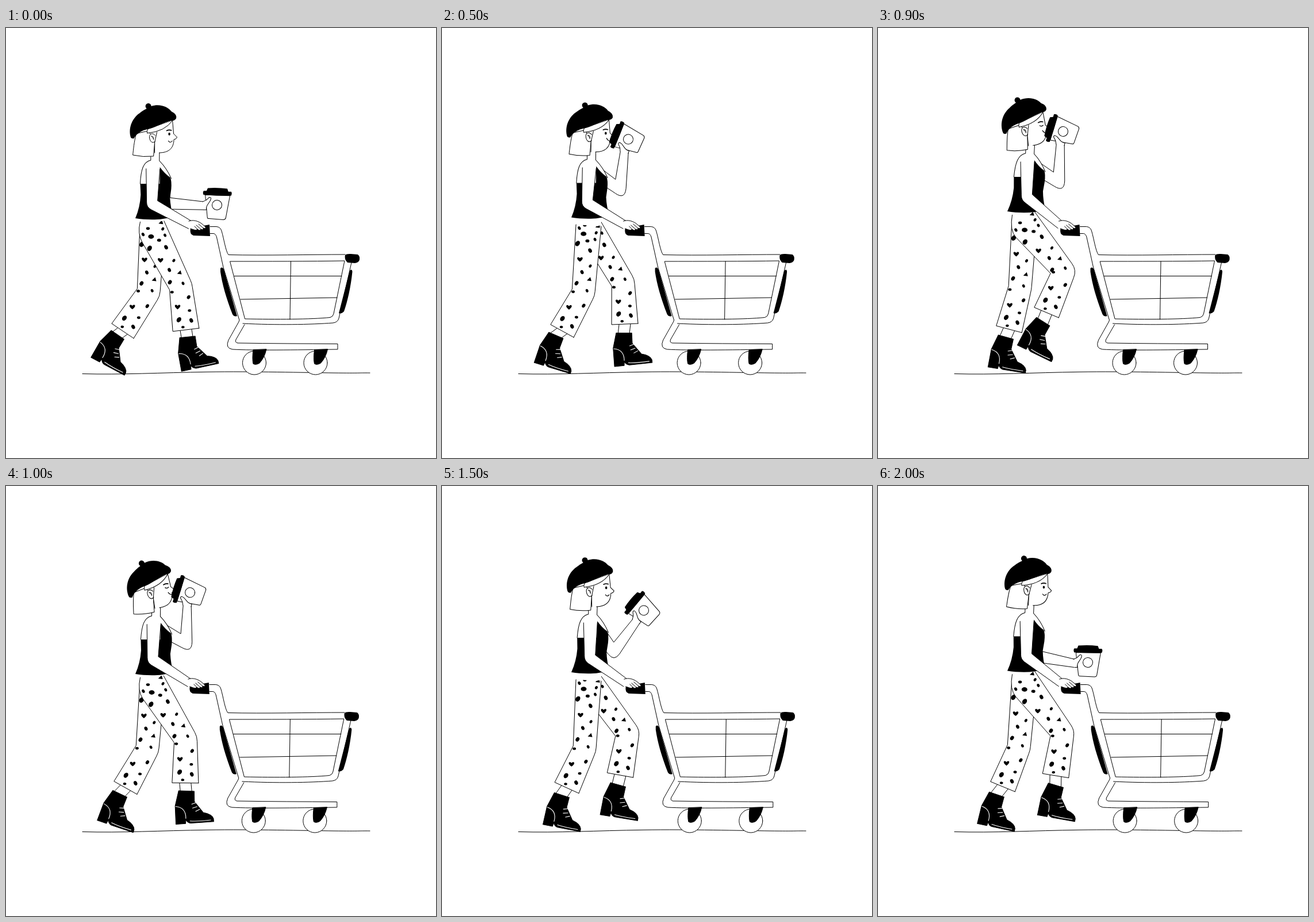
Recreate the animation shown at these times as an HTML page with a canvas. Size 748 by 748 pixels, loop 2.1 s.

```html
<!DOCTYPE html>
<html lang="en">
<head>
<meta charset="utf-8">
<title>Shopping walk</title>
<style>
html, body { margin: 0; width: 100%; height: 100%; overflow: hidden; background: #fff; }
canvas { display: block; width: 748px; height: 748px; }
</style>
</head>
<body>
<canvas id="stage"></canvas>
<script>
const SIZE = 748, LOOP = 2100, STRIDE = 1050, TICK = 100;
const canvas = document.getElementById('stage');
const ctx = canvas.getContext('2d');
const dpr = window.devicePixelRatio || 1;
canvas.width = canvas.height = SIZE * dpr;

const rad = d => d * Math.PI / 180;
const mix = (a, b, u) => a + (b - a) * u;
const mod = (a, n) => ((a % n) + n) % n;

// Cyclic keys [time, ...values], joined by a smooth curve without overshoot.
function track(keys, period) {
  const n = keys.length;
  const at = i => {
    const w = Math.floor(i / n);
    return keys[i - w * n].map((v, j) => j ? v : v + w * period);
  };
  const slope = (a, b, j) => (b[j] - a[j]) / (b[0] - a[0]);
  const blend = (s, r) => s * r <= 0 ? 0 : 2 * s * r / (s + r);
  return time => {
    const t = mod(time, period);
    let i = -1;
    while (i < n - 1 && keys[i + 1][0] <= t) i++;
    const [a, b, c, d] = [i - 1, i, i + 1, i + 2].map(at);
    const h = c[0] - b[0], u = (t - b[0]) / h;
    return b.slice(1).map((v, k) => {
      const j = k + 1, s = slope(b, c, j);
      const m0 = blend(slope(a, b, j), s) * h, m1 = blend(s, slope(c, d, j)) * h;
      const dv = c[j] - v;
      return v + u * (m0 + u * (3 * dv - 2 * m0 - m1 + u * (m0 + m1 - 2 * dv)));
    });
  };
}

// phase, knee x y, cuff x y, boot x y, boot angle
const nearLeg = track([
  [0, 304, 450, 313, 525, 315, 537, -12],
  [.143, 298, 455, 286, 527, 282, 542, 0],
  [.4286, 248, 457, 217, 525, 208, 537, 11],
  [.476, 246, 460, 209, 527, 198, 534, 17],
  [.619, 261, 467, 214, 522, 202, 531, 45],
  [.74, 297, 438, 247, 497, 235, 507, 58],
  [.857, 323, 424, 293, 495, 287, 510, 26],
  [.905, 321, 430, 309, 504, 309, 520, 10]
], 1);
const farLeg = track([
  [.119, 305, 452, 303, 525, 302, 541, -2],
  [.357, 247, 452, 228, 524, 222, 537, 9],
  [.405, 245, 455, 217, 523, 206, 536, 12],
  [.5, 248, 460, 203, 527, 194, 533, 28],
  [.643, 271, 472, 227, 514, 216, 525, 61],
  [.78, 300, 437, 262, 497, 250, 506, 50],
  [.929, 323, 430, 310, 503, 306, 519, 9],
  [.976, 315, 443, 318, 515, 316, 530, -6]
], 1);
const bob = track([
  [0, 0], [.119, 2.5], [.143, 1], [.357, -12], [.405, -9.5], [.4286, -7], [.476, -1.5]
], .5);
const tilt = track([
  [0, 0], [500, .4], [900, -5.8], [1200, -13.7], [1500, -.8], [1700, .8], [2000, 2.3]
], LOOP);
// time, cup x y, cup angle
const cupPose = track([
  [0, 367, 308, 2], [120, 367, 296, -10], [250, 353, 228, -47], [400, 327, 198, -65],
  [500, 324, 195, -68], [900, 322, 192, -73], [1200, 316, 184, -71],
  [1500, 351, 222, -50], [1700, 368, 294, -13], [1850, 366, 306, -2], [2000, 365, 307, 1]
], LOOP);

// along the leg (0 hip, 1 knee, 2 cuff), across, size, kind
const DOT = 0, HEART = 1, TRI = 2;
const spots = [
  [0, -.3, 3.2, DOT], [0, .72, 4, TRI], [.05, -.72, 3.2, DOT], [.13, -.35, 5, DOT],
  [.1, .65, 3, DOT], [.2, .6, 3, DOT], [.23, 0, 3.5, DOT], [.28, -.78, 5, DOT],
  [.37, .28, 4, DOT], [.51, -.5, 4.5, HEART], [.6, .4, 3, DOT], [.7, -.25, 3.6, DOT],
  [.8, .4, 4, TRI], [.87, -.65, 4, DOT], [.97, .3, 3, DOT], [1.1, -.8, 3, DOT],
  [1.26, .55, 3.6, DOT], [1.45, -.45, 4.5, HEART], [1.57, .47, 3, DOT],
  [1.75, -.45, 4.8, DOT], [1.8, .5, 4, DOT], [1.93, -.2, 2.8, DOT]
];

const path = d => new Path2D(d);
const art = {
  ground: path('M133 601.5 C200 603.5 270 599.5 350 598.3 S520 599.5 570 600 S610 599.8 633 600'),
  frame: path('M355 345.5 H366 Q373 346 375 353 C379 366 382 388 387 394.5 C450 396 530 394 590 394' +
    'M355 357.5 H361 Q365 358 366.5 364 L378 416 L405 505 Q407 508 405 511 L387 543 Q381 557 394 559' +
    'C430 561 500 560 577 559 V549.5 C520 549 460 549 403 548 Q398 547 400 542 L415 516' +
    'M390 406 C450 406 530 406 589 405 L570 497 Q569 502 564 503.500 C530 507 470 507 416 506 Z' +
    'M412 514 C470 517 530 516 569 513 Q577 512 579 505 L601 408' +
    'M397 431.500 H584 M408 472 L576 469 M495.500 406 L494 507'),
  pads: path('M321 348 L354 342 L355 362 L326 361 Q319 359 321 348Z' +
    'M590 395 Q592 392.5 600 393 L612 394 Q616 397 615 403 Q614 408 607 409 L594 408 Q588 402 590 395Z' +
    'M598 422 Q602 418 602.5 424 C600 450 594 476 588 493 Q583 498 579 496Z' +
    'M373 418 Q376 414 379 420 L402 501 Q397 503 394 498 C383 470 376 445 373 424Z'),
  fork: path('M430 560 Q428 575 430 584 Q434 587 441 583 Q450 573 453 559Z'),
  boot: path('M-13 -1 L14 2 L13 20 L27 40 Q42 44 44 52 V57 H4 Q-2 56 -4 50 L-5 57 H-22 L-21 25Z'),
  seams: path('M-20 26 C-8 28 -3 36 -4 48 M3 53 Q18 55 39 54 M8 24 l7 -2 M9 31 l8 -2 M14 37 l7 -3'),
  skin: path('M251 215 L266 214 V231 Q279 244 287 262 L267 273 H233 C234 246 238 233 251 230Z'),
  chest: path('M251 220 V230 C238 233 234 246 233 271 M266 216 V231 Q279 244 287 262'),
  shirt: path('M233 271 H267 V242 Q275 253 285 260 Q288 266 287 280 L285 296 Q286 312 291 328' +
    'C270 335 245 334 225 331 Q233 312 234 290Z'),
  hair: path('M226 184 C222 198 221 212 220 221 Q238 225 256 223 L258 199 L262 176Z'),
  face: path('M258 217 L258 198 L246 176 L289 161 L291 184 L297 190 Q295 194 291.5 194 C291 209 283 217 266 217'),
  fringe: path('M246 176 Q244 180 245 183 Q276 180 289 161 M262 181 L258 199'),
  ear: path('M259 187 C255 181 248 184 249 191 C250 198 255 202 259 197 M252 188 Q257 188 256 194'),
  beret: path('M216 189 C212 172 220 156 232 148 C238 143 243 141 244 140 A5 5 0 1 1 252 136' +
    'C268 131 282 138 287 145 Q297 150 295.5 157 Q293 162 287 161 C270 166 254 175 246 176' +
    'C235 178 225 185 222 192 Q217 193 216 189Z'),
  cup: path('M-21 -17 L-16 22 Q-16 24 -13 24 L12 25 Q15 25 16 22 L22 -17Z'),
  lid: path('M-24 -24 H-19 L-17 -29 Q0 -31 17 -29 L19 -24 H24 Q26 -21 24 -17 Q0 -16 -24 -17 Q-26 -21 -24 -24Z'),
  grip: path('M-25 -5 L-19 -8 L-14 -13 Q-9 -14 -12 -7 L-17 1 Q-19 6 -18 9 L-23 9'),
  hand: path('M318 336 C326 333 334 336 340 340 L347 346 Q348 350 343 348 Q344 352 339 350' +
    'Q338 354 333 350 Q331 353 327 351 L321 349'),
  fingers: path('M343 348 L335 341 M339 350 L331 343 M333 350 L328 345')
};

function ink(p, fill, line = '#000', w = 1) {
  if (fill) { ctx.fillStyle = fill; ctx.fill(p); }
  if (line) { ctx.strokeStyle = line; ctx.lineWidth = w; ctx.stroke(p); }
}
function placed(x, y, angle, draw) {
  ctx.save();
  ctx.translate(x, y);
  ctx.rotate(rad(angle));
  draw();
  ctx.restore();
}
function circle(x, y, rx, ry = rx, turn = 0) {
  const p = new Path2D();
  p.ellipse(x, y, rx, ry, turn, 0, 7);
  return p;
}

const heading = (a, b) => Math.atan2(b[1] - a[1], b[0] - a[0]);
const step = (p, angle, d) => [p[0] + Math.cos(angle) * d, p[1] + Math.sin(angle) * d];
const beside = (p, angle, d) => step(p, angle + Math.PI / 2, d);

function elbow(s, h, l1, l2) {
  const d = Math.min(Math.hypot(h[0] - s[0], h[1] - s[1]), l1 + l2 - .1);
  const bend = Math.acos((l1 * l1 + d * d - l2 * l2) / (2 * l1 * d));
  return step(s, heading(s, h) + bend, l1);
}

// Tapered two-part limb; returns its outline and the closed shape.
function limb(a, b, c, [ra, rb, rc], back = ra, hem = false) {
  const t1 = heading(a, b), t2 = heading(b, c), turn = t2 - t1;
  const line = new Path2D(), shape = new Path2D();
  const ends = [];
  const side = s => {
    const top = beside(a, t1, s * (s > 0 ? back : ra));
    const end = beside(c, t2, s * rc);
    const corner = beside(b, (t1 + t2) / 2, s * rb / Math.cos(turn / 2));
    const ops = [['lineTo', ...top]];
    if (s * turn < 0) {
      ops.push(['lineTo', ...step(beside(b, t1, s * rb), t1, -3)]);
      ops.push(['quadraticCurveTo', ...corner, ...step(beside(b, t2, s * rb), t2, 3)]);
    } else ops.push(['lineTo', ...corner]);
    ops.push(['lineTo', ...end]);
    ends.push(end);
    return { ops, top, corner, end };
  };
  const L = side(1), R = side(-1);
  if (back > ra) {
    const q = [mix(L.top[0], L.corner[0], .16), mix(L.top[1], L.corner[1], .16)];
    L.ops.splice(0, 1, ['lineTo', a[0] - 21.5, a[1] - 8], ['quadraticCurveTo', ...L.top, ...q]);
  }
  const run = (p, ops) => ops.forEach(([f, ...v]) => p[f](...v));
  run(line, L.ops);
  if (hem) line.lineTo(...R.end); else line.moveTo(...R.end);
  const reversed = [R.end];
  run(shape, L.ops);
  shape.lineTo(...reversed[0]);
  if (turn > 0) {
    shape.lineTo(...step(beside(b, t2, -rb), t2, 3));
    shape.quadraticCurveTo(...R.corner, ...step(beside(b, t1, -rb), t1, -3));
  } else shape.lineTo(...R.corner);
  shape.lineTo(...R.top);
  shape.closePath();
  line.moveTo(...R.top);
  run(line, R.ops.slice(1));
  return { line, shape };
}

function spot([x, y], size, kind, turn) {
  const p = new Path2D();
  if (kind === DOT) p.ellipse(x, y, size, size * .76, turn, 0, 7);
  else if (kind === TRI) {
    p.moveTo(x - size, y + 2); p.lineTo(x + 2, y - size); p.lineTo(x + size, y + 3);
  } else {
    p.moveTo(x, y + size);
    p.bezierCurveTo(x - 9, y - 2, x - 3, y - 6, x, y - 1.5);
    p.bezierCurveTo(x + 3, y - 6, x + 9, y - 2, x, y + size);
  }
  ink(p, '#000', null);
}

function leg(hip, [kx, ky, cx, cy, bx, by, angle], near) {
  const knee = [kx, ky], cuff = [cx, cy], boot = [bx, by];
  const t1 = heading(hip, knee), t2 = heading(knee, cuff);
  const ankle = new Path2D();
  for (const s of [10, -10]) {
    ankle.moveTo(...beside(cuff, t2, s));
    ankle.lineTo(...step(beside(boot, t2, s), t2, 2));
  }
  ink(ankle);
  placed(bx, by, angle, () => {
    ink(art.boot, '#000');
    ink(art.seams, null, '#fff', 1.1);
  });

  const back = 22 + (near ? 18 * Math.max(0, Math.cos(t1)) : 0);
  const pants = limb(hip, knee, cuff, [22, 20, 23], back, true);
  ink(pants.shape, '#fff', null);
  ctx.save();
  ctx.clip(pants.shape);
  spots.forEach(([u, v, size, kind], i) => {
    const low = u > 1, k = low ? u - 1 : u;
    const from = low ? knee : hip, to = low ? cuff : knee;
    const wide = low ? mix(20, 23, k) : mix(v < 0 ? back : 22, 20, k);
    const mid = [mix(from[0], to[0], k), mix(from[1], to[1], k)];
    spot(beside(mid, low ? t2 : t1, -v * wide), size, kind, i * 2.1);
  });
  ctx.restore();
  ink(pants.line);
}

function cart(dx) {
  ctx.save();
  ctx.translate(dx, 0);
  for (const x of [0, 106.5]) {
    ink(circle(432 + x, 582.5, 20.5), '#fff');
    ctx.save();
    ctx.translate(x, 0);
    ink(art.fork, '#000');
    ctx.restore();
  }
  ink(art.pads, '#000', null);
  ink(art.frame);
  ctx.restore();
}

function head(x, y, angle, asleep, sipping) {
  placed(x, y, angle, () => {
    ctx.translate(-258, -222);
    ink(art.hair, '#fff');
    ink(art.face, '#fff');
    ink(art.ear, '#fff');
    ink(art.fringe, '#fff');
    ink(art.beret, '#000', null);
    ink(path('M279 178.500 Q283 176.500 287 178'), null, '#000', 1.7);
    if (asleep) ink(path('M281 184 Q284 186.500 287 184'), null, '#000', 1.2);
    else ink(circle(283.5, 184.5, 1.8, 2.4), '#000', null);
    ink(path(sipping ? 'M285 193 Q287 197 291 198' : 'M282 196.500 Q285 201 288.500 196.500'), null, '#000', 1.2);
  });
}

function draw(t) {
  ctx.setTransform(dpr, 0, 0, dpr, 0, 0);
  ctx.fillStyle = '#fff';
  ctx.fillRect(0, 0, SIZE, SIZE);
  ctx.lineCap = ctx.lineJoin = 'round';

  const phase = t / STRIDE;
  const [dy] = bob(phase);
  const lean = .8 - .4 * dy;
  const push = 4 * Math.cos(2 * Math.PI * (phase - .19)) - 1.5;
  const hip = [255, 345 + dy];

  let [cx, cy, turn] = cupPose(t);
  cy += dy * Math.min(1, Math.max(0, (308 - cy) / 108));
  const a = rad(turn);
  const wrist = [cx - 23 * Math.cos(a) - 2 * Math.sin(a), cy - 23 * Math.sin(a) + 2 * Math.cos(a)];

  ink(art.ground);

  const farTop = [262 + lean * .8, 250 + dy];
  const farArm = limb(farTop, elbow(farTop, wrist, 57, 66), wrist, [11.5, 10, 7]);
  ink(farArm.shape, '#fff', null);
  ink(farArm.line);

  leg(hip, farLeg(phase + .5), false);
  const pelvis = new Path2D();
  pelvis.moveTo(235, 328 + dy);
  pelvis.lineTo(233, 338 + dy);
  pelvis.lineTo(277, 346 + dy);
  pelvis.lineTo(277, 328 + dy);
  ink(pelvis, '#fff', null);
  leg(hip, nearLeg(phase), true);

  ctx.save();
  ctx.transform(1, 0, -lean / 100, 1, lean * 3.31, dy);
  ink(art.skin, '#fff', null);
  ink(art.shirt, '#000', null);
  ink(art.chest);
  ctx.restore();

  head(258 + lean * .75, 222 + dy, tilt(t)[0], t >= 700 && t < 1400, t >= 400 && t < 1400);
  cart(push);

  const top = [255 + lean * .9, 245 + dy], grip = [321 + push, 343];
  const arm = limb(top, elbow(top, grip, 61, 76.5), grip, [12, 9.5, 7]);
  ink(arm.shape, '#fff', null);
  ink(arm.line);
  ctx.save();
  ctx.translate(push, 0);
  ink(art.hand, '#fff');
  ink(art.fingers);
  ctx.restore();

  placed(cx, cy, turn, () => {
    ink(art.cup, '#fff');
    ink(art.lid, '#000', null);
    ink(circle(0, 0, 8.5));
    ink(art.grip, '#fff');
  });
}

const start = performance.now();
function loop() {
  const t = mod(performance.now() - start, LOOP);
  draw(Math.floor(t / TICK) * TICK);
  requestAnimationFrame(loop);
}
loop();
</script>
</body>
</html>
```
